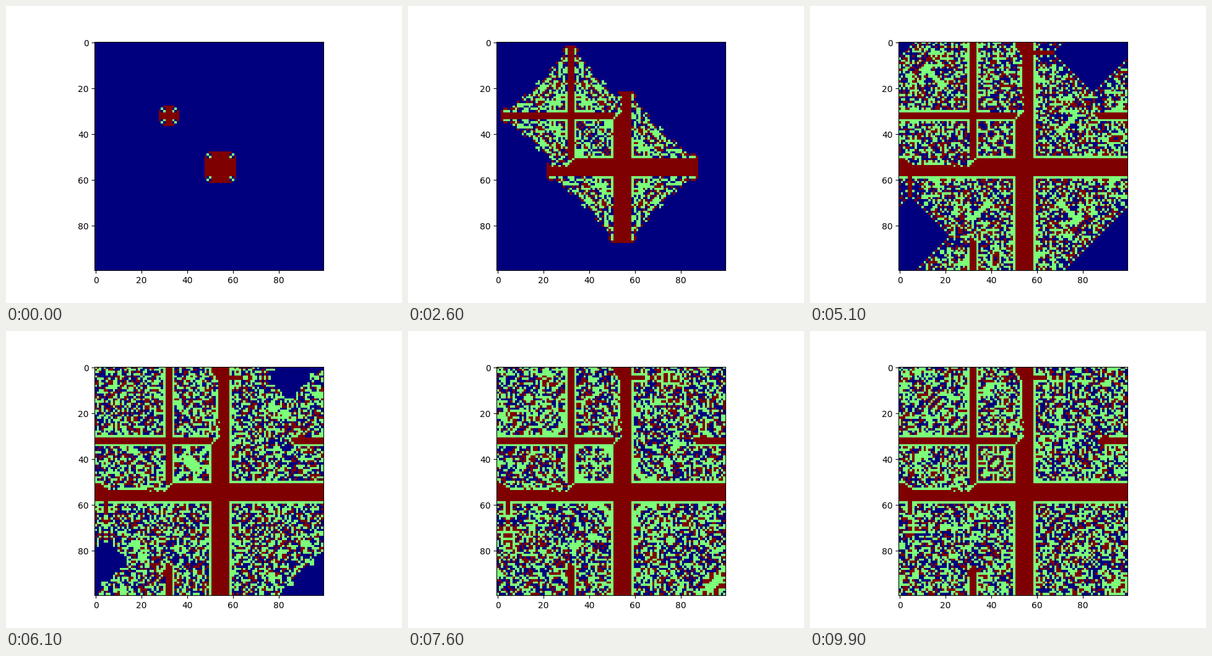
Recreate the animation shown at these times as a matplotlib script. Size 640 by 480 pixels, loop 10000 ms.

```python
import numpy as np
import matplotlib.pyplot as plt
from matplotlib.animation import FuncAnimation

SIZE = 100
FRAMES = 100
WARMUP = 2


def seed():
    grid = np.zeros((SIZE, SIZE), dtype=int)
    grid[30:35, 30:35] = 2
    grid[50:60, 50:60] = 2
    return grid


def step(grid):
    """Sum of the four neighbours mod 3; crowded cells keep their state."""
    total = sum(np.roll(grid, shift, axis) for shift in (-1, 1) for axis in (0, 1))
    return np.where(total < 5, total % 3, grid)


def run():
    grid = seed()
    for _ in range(WARMUP):
        grid = step(grid)
    states = [grid]
    while len(states) < FRAMES:
        states.append(step(states[-1]))
    return states


states = run()

fig, ax = plt.subplots(figsize=(6.4, 4.8), dpi=100)
image = ax.imshow(states[0], cmap="jet", vmin=0, vmax=2, interpolation="nearest")


def update(i):
    image.set_data(states[i])
    return (image,)


anim = FuncAnimation(fig, update, frames=FRAMES, interval=100, repeat=True, repeat_delay=0)
plt.show()
```
